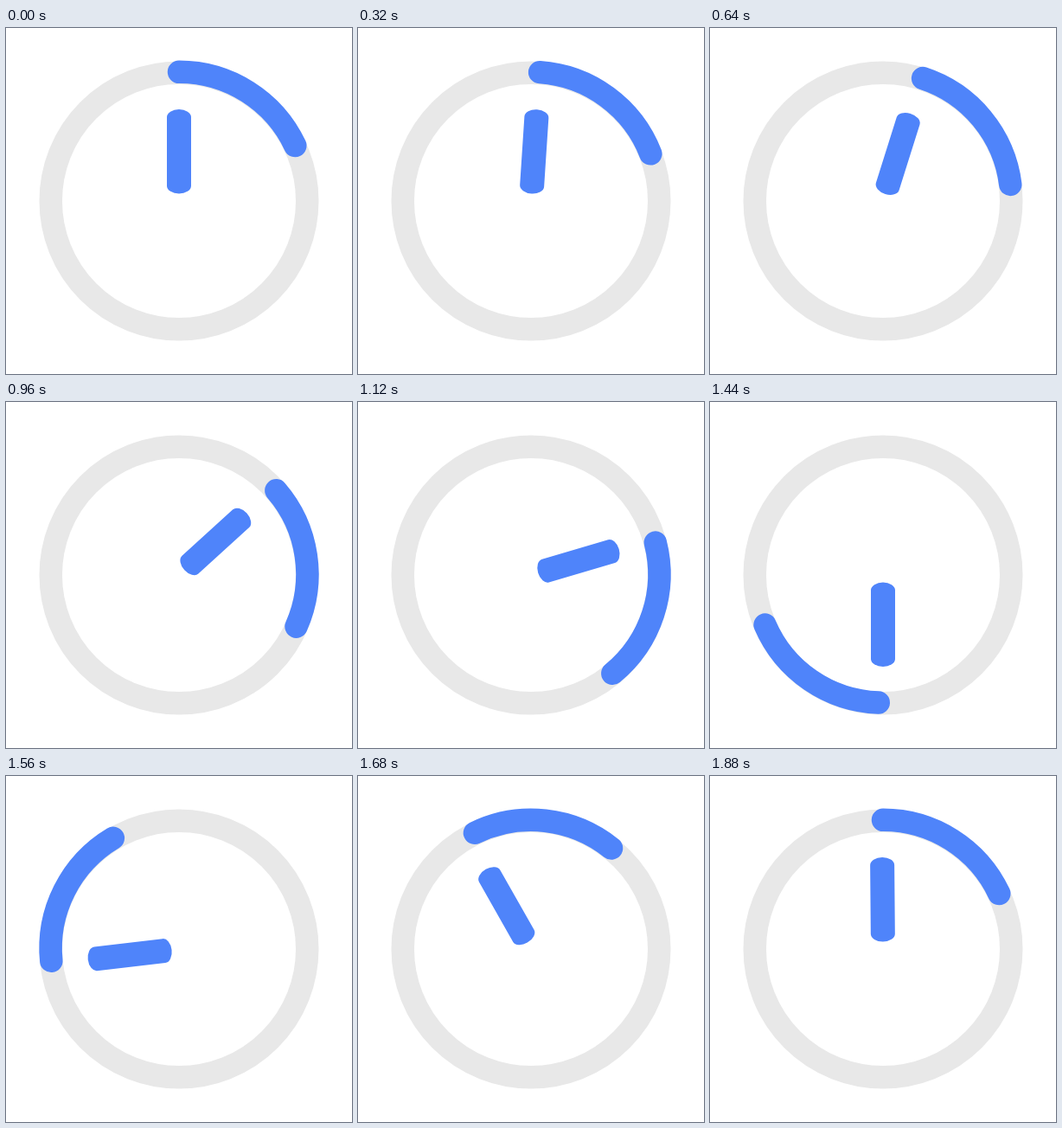
Animation of 400x400 px, one loop 1.92 s. Source, as an HTML page:

```html
<!DOCTYPE html>
<html lang="en">
<head>
<meta charset="utf-8">
<title>Clock loader</title>
<style>
  html, body { margin: 0; width: 100%; height: 100%; overflow: hidden; background: #fff; }
  svg { display: block; width: 100%; height: 100%; }
</style>
</head>
<body>
<svg viewBox="0 0 400 400">
  <circle cx="200" cy="200" r="148.25" fill="none" stroke="#e8e8e8" stroke-width="26.5"/>
  <path id="arc" fill="none" stroke="#4f84fa" stroke-width="26.5" stroke-linecap="round"/>
  <rect id="hand" x="186" y="94" width="28" height="97.5" rx="14" ry="9" fill="#4f84fa"/>
</svg>
<script>
const LOOP = 1920, STEP = 40;
const ARC = { x: 200, y: 199.2, r: 148.4, span: 64.8, time: 1880 };
const arc = document.getElementById('arc');
const hand = document.getElementById('hand');

// Cubic Bezier easing with control points (1, 0) and (x2, 1).
function ease(x, x2) {
  if (x <= 0) return 0;
  if (x >= 1) return 1;
  let low = 0, high = 1;
  for (let i = 0; i < 30; i++) {
    const s = (low + high) / 2, u = 1 - s;
    if (3 * s * u * u + 3 * x2 * s * s * u + s ** 3 < x) low = s;
    else high = s;
  }
  return low * low * (3 - 2 * low);
}

function arcPoint(degrees) {
  const a = degrees * Math.PI / 180;
  return `${ARC.x + ARC.r * Math.sin(a)} ${ARC.y - ARC.r * Math.cos(a)}`;
}

arc.setAttribute('d', `M${arcPoint(0)} A${ARC.r} ${ARC.r} 0 0 1 ${arcPoint(ARC.span)}`);

function draw(now) {
  const t = Math.floor(now % LOOP / STEP) * STEP;
  const arcAngle = 360 * ease(t / ARC.time, 0.704);
  const handAngle = 360 * ease(t / LOOP, 2 / 3);
  arc.setAttribute('transform', `rotate(${arcAngle} ${ARC.x} ${ARC.y})`);
  hand.setAttribute('transform', `rotate(${handAngle} 200 200)`);
}

let start;
function tick(now) {
  start ??= now;
  draw(now - start);
  requestAnimationFrame(tick);
}
draw(0);
requestAnimationFrame(tick);
</script>
</body>
</html>
```
